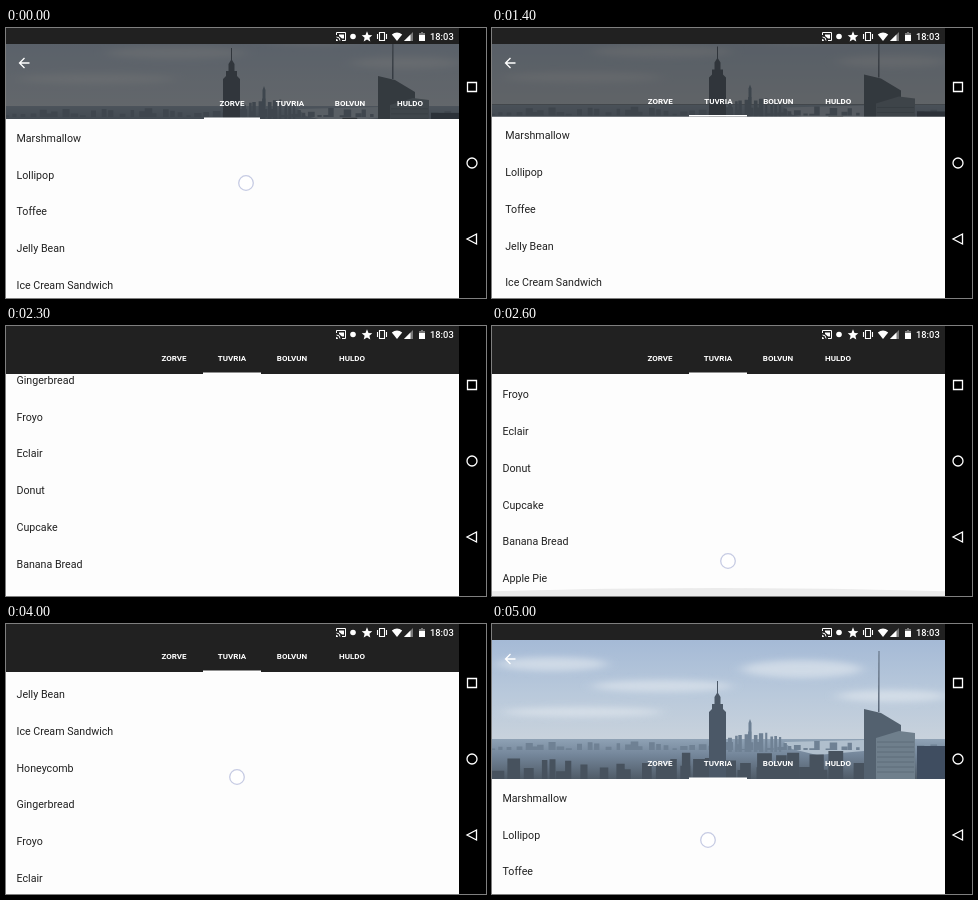
Recreate the animation shown at these times as an HTML page. Size 480 by 270 pixels, loop 5100 ms.

```html
<!DOCTYPE html>
<html lang="en">
<head>
<meta charset="utf-8">
<title>Collapsing header with tabs</title>
<style>
  html, body { margin: 0; width: 100%; height: 100%; overflow: hidden; background: #000; }
  #stage { display: block; width: 480px; height: 270px; font-family: Roboto, sans-serif; }
  #pages text { font-size: 10.67px; fill: #212121; }
  #tabs text { font-size: 8px; font-weight: 700; fill: #fff; text-anchor: middle; }
  #clock { font-size: 9.33px; font-weight: 500; fill: #fff; }
  .line { fill: none; stroke: #fff; stroke-width: 1.3; }
</style>
</head>
<body>
<svg id="stage" viewBox="0 0 480 270">
  <defs>
    <linearGradient id="sky" x2="0" y2="1">
      <stop offset="0" stop-color="#a5bad6"/>
      <stop offset=".55" stop-color="#b9c9db"/>
      <stop offset="1" stop-color="#c8d2dc"/>
    </linearGradient>
    <linearGradient id="land" x2="0" y2="1">
      <stop offset="0" stop-color="#8fa2b5"/>
      <stop offset=".4" stop-color="#74869a"/>
      <stop offset="1" stop-color="#4f5b67"/>
    </linearGradient>
    <filter id="soft" x="-30%" y="-100%" width="160%" height="300%">
      <feGaussianBlur stdDeviation="7 3"/>
    </filter>
  </defs>

  <g id="photo">
    <path fill="url(#sky)" d="M0 16H453V115H0z"/>
    <g fill="#e4eaf0" opacity=".6" filter="url(#soft)">
      <ellipse cx="60" cy="40" rx="55" ry="7"/>
      <ellipse cx="170" cy="62" rx="70" ry="6"/>
      <ellipse cx="310" cy="45" rx="60" ry="9"/>
      <ellipse cx="400" cy="72" rx="55" ry="6"/>
      <ellipse cx="90" cy="88" rx="80" ry="5"/>
    </g>
    <path fill="url(#land)" d="M0 115H453V155H0z"/>
    <path fill="#b0bfcd" d="M292 118L372 116V127L325 131L300 125z"/>
    <path id="far" fill="#6f8194"/>
    <path id="near" fill="#47525e"/>
    <path fill="#6d8094" d="M256.500 115V99L258 95L259.500 99V115z"/>
    <path fill="#4b5867" d="M225 57H226V69L228.500 73V80H231V85L234 88V155H217V88L220 85V80H222.500V73L225 69z"/>
    <path fill="#596778" d="M386.500 27H387.500V88H386z"/>
    <path fill="#53616f" d="M372 85L389 89L409 101V155H372z"/>
    <path fill="#6f7f8c" d="M384 114L407 107L423 109V155H384z"/>
    <path fill="none" stroke="#586774" stroke-width=".8" d="M385 118H422M385 123H422M385 128H422M385 133H422M385 138H422M385 143H422M385 148H422"/>
    <path fill="#3f4d60" d="M425 122H453V155H425z"/>
  </g>
  <path id="shade" fill="#212121" d="M0 16H453V156H0z"/>
  <path id="back" class="line" d="M23.500 35H13.500M18.500 30L13.500 35L18.500 40"/>
  <g id="tabs"><g id="strip"></g></g>

  <svg id="list" width="453">
    <rect width="453" height="270" fill="#fdfdfd"/>
    <g id="pages"></g>
  </svg>
  <path id="bar" fill="#fff"/>
  <path id="glow" fill="#ebebeb"/>
  <circle id="finger" r="7.300" fill="#fff" fill-opacity=".7" stroke="#c6cbe3" stroke-width="1.300"/>

  <path fill="#212121" d="M0 0H453V16H0z"/>
  <g fill="#fff">
    <path class="line" style="stroke-width:1" d="M330.500 7V4.500H339.500V12.500H336M330.500 9A3.500 3.500 0 0 1 334 12.500"/>
    <path d="M330 11A2 2 0 0 1 332 13H330zM333 6.500H338V10.500H336L333 8z"/>
    <circle cx="347" cy="8.500" r="2.800"/>
    <path d="M361 3.300L362.500 6.900L366.300 7.200L363.400 9.700L364.300 13.400L361 11.400L357.700 13.400L358.600 9.700L355.700 7.200L359.500 6.900z"/>
    <path class="line" style="stroke-width:1.1" d="M373.500 4.500H378.500V12.500H373.500zM371.500 6V11M380.500 6V11"/>
    <path d="M385.800 6.500Q391 2.500 396.200 6.500L391 13z"/>
    <path opacity=".4" d="M398 13L407 4V13z"/>
    <path d="M398 13L404.500 6.500V13z"/>
    <path opacity=".4" d="M413 5H415V4H417V5H419V13H413z"/>
    <path d="M413 7H419V13H413z"/>
  </g>
  <text id="clock" x="424" y="12">18:03</text>

  <path d="M453 0H480V270H453z"/>
  <path class="line" d="M461.500 54.500H470.500V63.500H461.500zM470.500 206V216L461 211z"/>
  <circle class="line" cx="466" cy="135" r="5"/>
</svg>

<script>
const LOOP = 5100, TICK = 100, LEAD = 20;
const WIDTH = 453, OPEN = 155, CLOSED = 48, ROW = 36.75, PARALLAX = 0.58;
const TABS = [['ZORVE', 226], ['TUVRIA', 284], ['BOLVUN', 344], ['HULDO', 404]];
const ITEMS = ['Marshmallow', 'Lollipop', 'Toffee', 'Jelly Bean', 'Ice Cream Sandwich',
  'Honeycomb', 'Gingerbread', 'Froyo', 'Eclair', 'Donut', 'Cupcake', 'Banana Bread', 'Apple Pie'];

// Tracks of [time, value]
const SCROLL = [[0, 64], [200, 66.5], [1800, 66.5], [1900, 82], [2000, 150], [2200, 292],
  [2300, 340.5], [2400, 362.75], [3400, 362.75], [3500, 350], [3600, 322], [3700, 305],
  [3800, 293], [3900, 261], [4000, 214], [4200, 114], [4300, 66], [4400, 27], [4500, 9],
  [4600, 2], [4700, 0]];
const SWIPE = [[700, 0], [800, .06], [900, .22], [1000, .47], [1100, .74], [1200, .91],
  [1300, .975], [1400, .994], [1500, 1]];
const GLOW = [[2400, 0], [2600, 8], [2900, 17], [3000, 12], [3300, 0]];
// Touches: start, end, from x, y, to x, y
const TOUCHES = [[0, 100, 240, 155, 240, 153], [700, 1000, 300, 168, 150, 164],
  [1900, 2100, 236, 228, 236, 82], [2600, 2900, 236, 235, 236, 160],
  [3500, 3600, 231, 108, 231, 136], [3900, 4100, 231, 106, 231, 200],
  [5000, 5100, 216, 216, 216, 216]];

const $ = id => document.getElementById(id);
const set = (id, attrs) => {
  for (const name in attrs) $(id).setAttribute(name, attrs[name]);
};
const mix = (a, b, k) => a + (b - a) * k;

function at(track, t) {
  const i = track.findIndex(key => key[0] > t);
  if (i < 0) return track[track.length - 1][1];
  if (i === 0) return track[0][1];
  const [t0, a] = track[i - 1], [t1, b] = track[i];
  return mix(a, b, (t - t0) / (t1 - t0));
}

let seed = 7;
const rand = () => (seed = seed * 16807 % 2147483647) / 2147483647;

function skyline(from, to, gap, top, spread, floor) {
  let d = '';
  for (let x = from; x < to; x += gap * (0.5 + rand())) {
    const w = gap * (0.4 + rand() * 0.6), y = top + spread * rand();
    d += `M${x.toFixed(1)} ${floor}V${y.toFixed(1)}h${w.toFixed(1)}V${floor}z`;
  }
  return d;
}

function build() {
  set('far', { d: skyline(0, 445, 8, 117, 8, 126) + skyline(236, 292, 5, 106, 9, 128) });
  set('near', { d: skyline(0, 365, 13, 134, 14, 155) + skyline(150, 340, 16, 125, 16, 155) });
  $('strip').innerHTML = TABS.map(([name, x]) => `<text x="${x}">${name}</text>`).join('');
  const rows = ITEMS.map((name, i) => `<text x="10.5" y="${22.8 + i * ROW}">${name}</text>`).join('');
  $('pages').innerHTML = `<g>${rows}</g><g transform="translate(${WIDTH})">${rows}</g>`;
}

function draw(t) {
  const scroll = at(SCROLL, t), page = at(SWIPE, t), glow = at(GLOW, t);
  const edge = Math.max(CLOSED, OPEN - scroll);
  const inner = Math.max(0, scroll - (OPEN - CLOSED));
  const half = mix(28, 29, page);

  set('photo', { transform: `translate(0 ${(edge - OPEN) * PARALLAX})` });
  set('shade', { opacity: (OPEN - edge) / (OPEN - CLOSED) });
  set('back', { transform: `translate(0 ${Math.min(0, edge - 86)})` });
  set('tabs', { transform: `translate(0 ${edge - 12.7})` });
  set('strip', { transform: `translate(${-58 * page})` });
  set('list', { y: edge, height: 270 - edge });
  set('pages', { transform: `translate(${-WIDTH * page} ${-inner})` });
  set('bar', { d: `M${226 - half} ${edge - 1.5}h${2 * half}v1.500h${-2 * half}z` });
  set('glow', { d: glow ? `M0 270V${270 - glow * .58}Q226.500 ${270 - glow * 1.42} 453 ${270 - glow * .58}V270z` : '' });

  const touch = TOUCHES.find(([a, b]) => t >= a && t <= b);
  set('finger', { visibility: touch ? 'visible' : 'hidden' });
  if (touch) {
    const [a, b, x0, y0, x1, y1] = touch, k = (t - a) / (b - a);
    set('finger', { cx: mix(x0, x1, k), cy: mix(y0, y1, k) });
  }
}

function frame() {
  const now = (performance.now() + LEAD) % LOOP;
  draw(Math.floor(now / TICK) * TICK);
  requestAnimationFrame(frame);
}

build();
frame();
</script>
</body>
</html>
```
